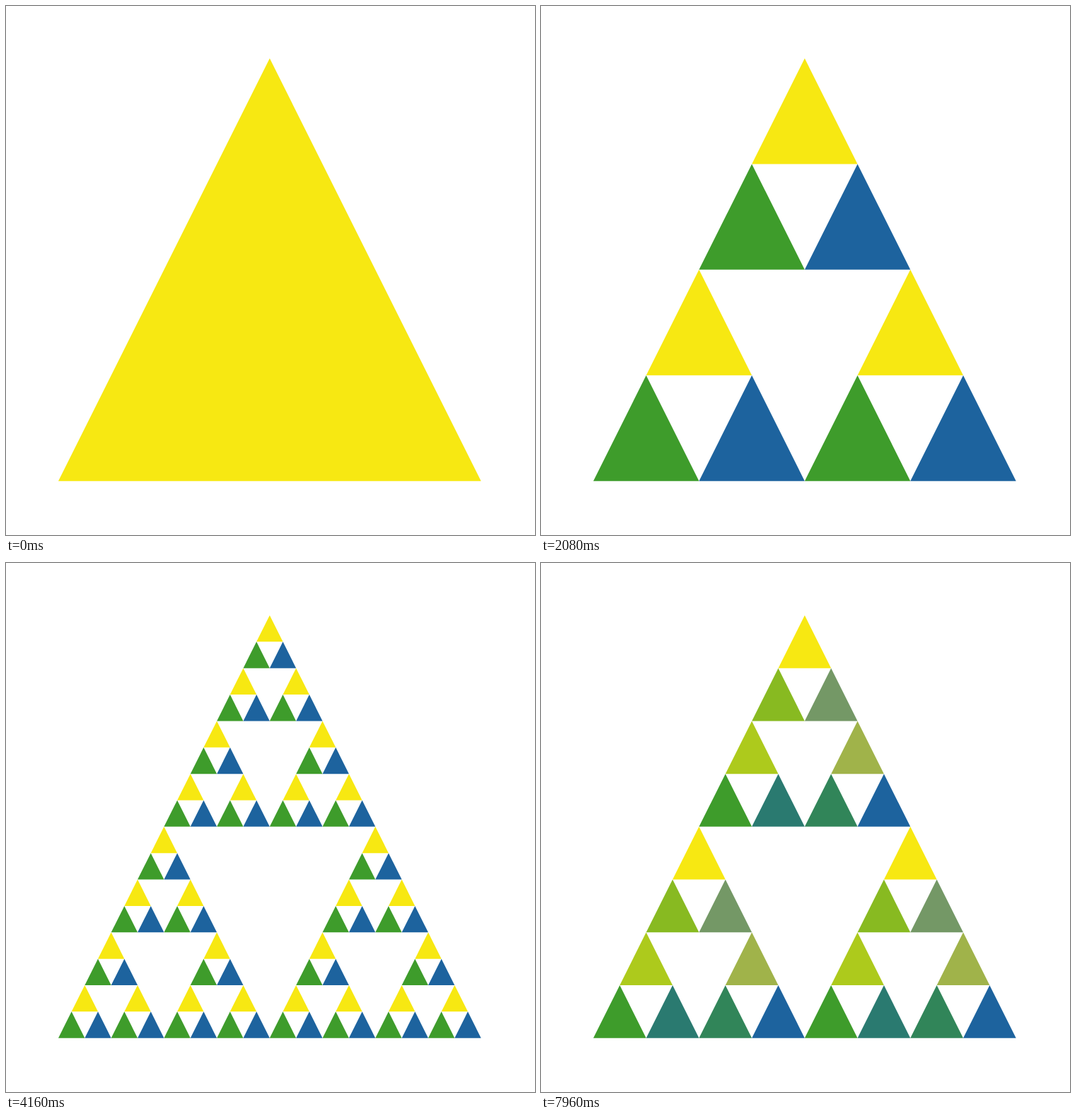
These frames come from a looping animation (748x748 px, 8 s). An HTML page with a canvas:

```html
<!DOCTYPE html>
<html lang="en">
<head>
<meta charset="utf-8">
<title>Sierpinski triangle</title>
<style>
  html, body { margin: 0; width: 100%; height: 100%; overflow: hidden; background: #fff; }
  canvas { display: block; width: 100vw; height: 100vh; }
</style>
</head>
<body>
<canvas width="748" height="748"></canvas>
<script>
const ctx = document.querySelector('canvas').getContext('2d');
const YELLOW = [247, 232, 18], GREEN = [62, 156, 43], BLUE = [29, 99, 158];
const LEVELS = [0, 1, 2, 3, 4, 5, 4, 3, 2];
const LOOP = 8000, HOLD = 500, PERIOD = 1040, STEP = 60, STEPS = 10;

const mix = (a, b, p) => a.map((v, i) => v + (b[i] - v) * p);

function triangle(x, y, size, color) {
  ctx.fillStyle = `rgb(${color.map(Math.round)})`;
  ctx.beginPath();
  ctx.moveTo(x + size / 2, y);
  ctx.lineTo(x + size, y + size);
  ctx.lineTo(x, y + size);
  ctx.fill();
}

const children = (x, y, size) => [
  [x + size / 4, y, size / 2, YELLOW],
  [x, y + size / 2, size / 2, GREEN],
  [x + size / 2, y + size / 2, size / 2, BLUE]
];

// Calls visit for every triangle at the given depth.
function walk(depth, visit, cell = [74, 74, 597.7, YELLOW]) {
  if (depth === 0) visit(...cell);
  else for (const child of children(...cell)) walk(depth - 1, visit, child);
}

function draw(t) {
  ctx.fillStyle = '#fff';
  ctx.fillRect(0, 0, 748, 748);

  const i = Math.floor((t - HOLD) / PERIOD);
  const elapsed = t - HOLD - i * PERIOD;
  const p = Math.min(STEPS, Math.floor(elapsed / STEP) + 1) / STEPS;
  const from = LEVELS[Math.max(i, 0)], to = LEVELS[i + 1];
  if (i < 0 || p === 1) return walk(to, triangle);

  const splitting = to > from;
  walk(Math.min(from, to), (x, y, size, color) => {
    if (splitting) triangle(x, y, size, color);
    for (const [cx, cy, half, own] of children(x, y, size))
      triangle(cx, cy, half, mix(color, own, splitting ? p : 1 - p));
  });
}

const start = performance.now();
function frame() {
  draw((performance.now() - start) % LOOP);
  requestAnimationFrame(frame);
}
frame();
</script>
</body>
</html>
```
